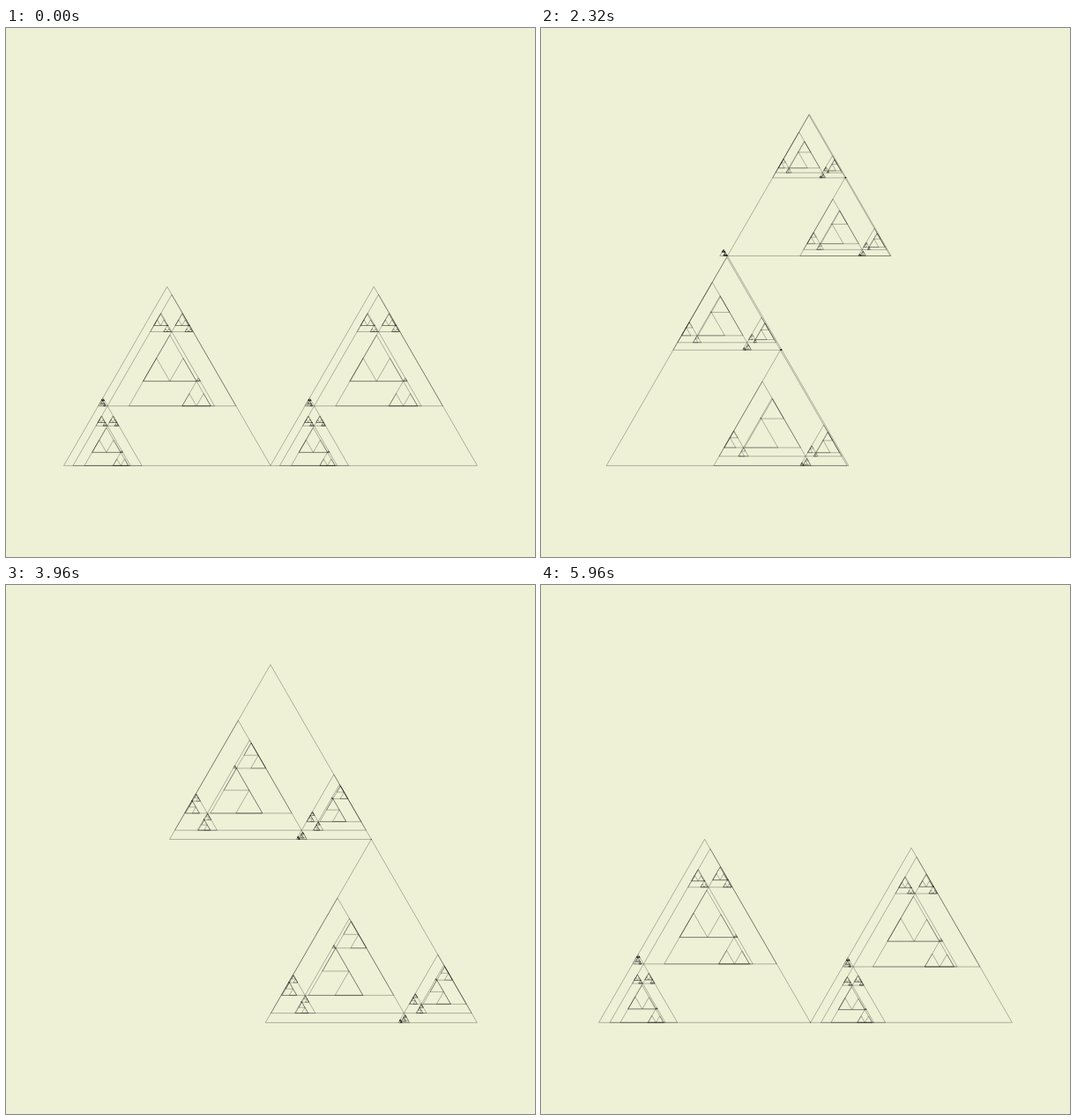
Animation of 600x600 px, one loop 6000 ms. Source, as an HTML page with a canvas:

```html
<!DOCTYPE html>
<html lang="en">
<head>
<meta charset="utf-8">
<title>Orbiting triangle subdivision</title>
<style>
  html, body { margin: 0; width: 100%; height: 100%; overflow: hidden; background: #eef1d6; }
  canvas { display: block; width: 600px; height: 600px; }
</style>
</head>
<body>
<canvas id="stage" width="600" height="600"></canvas>
<script>
const ctx = document.getElementById('stage').getContext('2d');
const LOOP = 6000, STEP = 40, DEPTH = 5;
const TALL = Math.sqrt(3) / 2;      // height of a unit triangle
const INRADIUS = TALL / 3;
const SIDE = 469, LEFT = 300 - SIDE / 2, BASE = 496.4;

function triangle(x, y, side) {
  ctx.beginPath();
  ctx.moveTo(x, y);
  ctx.lineTo(x + side, y);
  ctx.lineTo(x + side / 2, y - side * TALL);
  ctx.closePath();
  ctx.stroke();
}

// A point on the incircle splits the triangle into three that meet there;
// each level runs a quarter turn ahead of its parent.
function split(x, y, side, angle, depth) {
  const r = side * INRADIUS;
  const px = x + side / 2 - r * Math.sin(angle);
  const rise = r * (1 - Math.cos(angle));
  const py = y - rise;
  const low = rise / TALL;
  const parts = [
    [px - low / 2, y, low],
    [x + low / 2, py, px - x - low / 2],
    [px, py, x + side - low / 2 - px]
  ];
  for (const [cx, cy, size] of parts) {
    if (size < 1e-6) continue;
    triangle(cx, cy, size);
    if (depth > 1) split(cx, cy, size, angle + Math.PI / 2, depth - 1);
  }
}

function draw(time) {
  const t = Math.floor(time % LOOP / STEP) * STEP;
  ctx.fillStyle = '#eef1d6';
  ctx.fillRect(0, 0, 600, 600);
  ctx.lineWidth = 0.5;
  ctx.strokeStyle = 'rgba(0, 0, 0, 0.55)';
  split(LEFT, BASE, SIDE, t / LOOP * 2 * Math.PI, DEPTH);
}

const start = performance.now();
function tick() {
  draw(performance.now() - start);
  requestAnimationFrame(tick);
}
tick();
</script>
</body>
</html>
```
